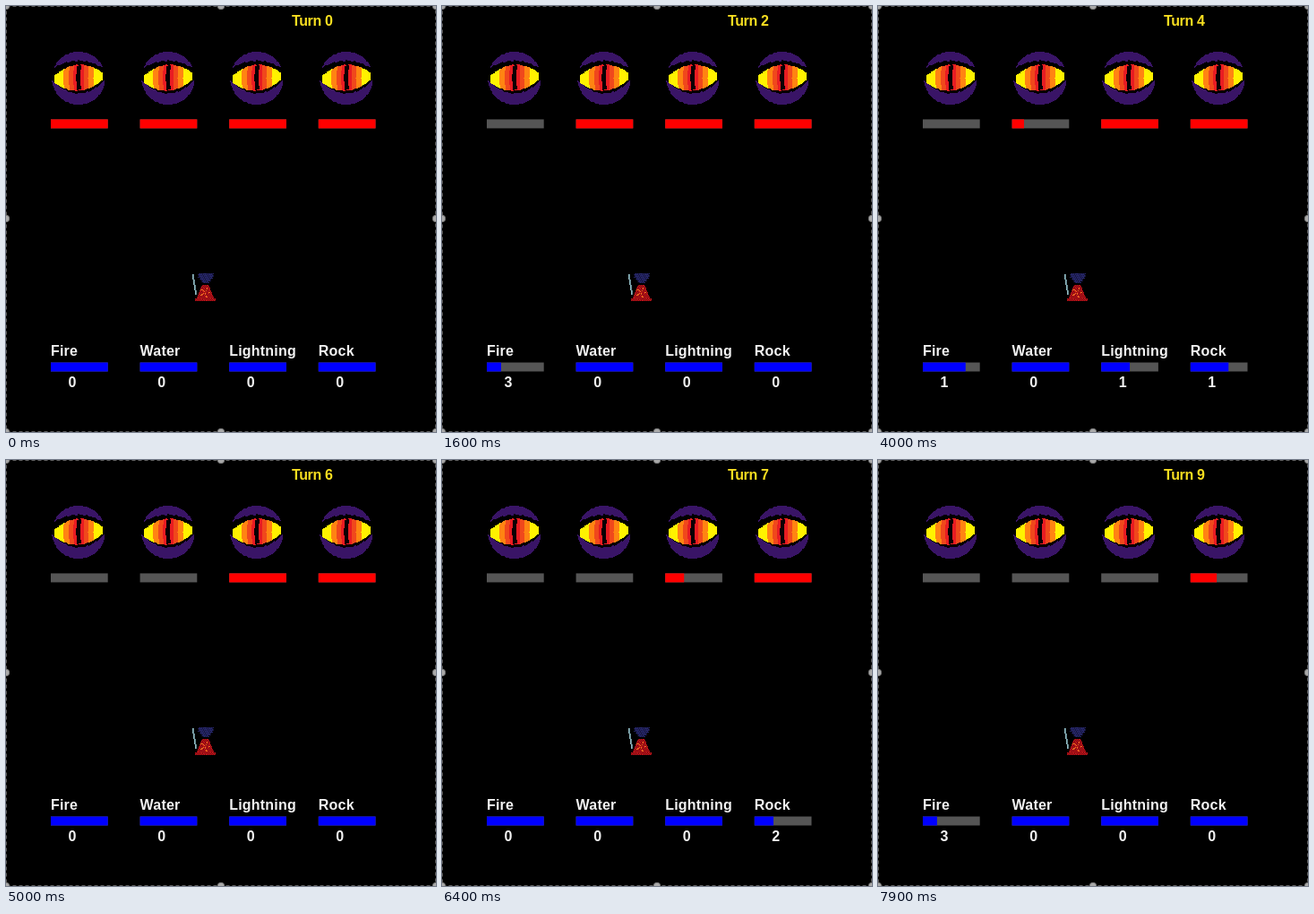
An HTML page with a canvas for the animation above (8000 ms loop, 480 by 475 pixels).

```html
<!DOCTYPE html>
<html lang="en">
<head>
<meta charset="utf-8">
<title>Spell battle</title>
<style>
html, body { margin: 0; width: 100%; height: 100%; overflow: hidden; background: #000; }
canvas { display: block; width: 480px; height: 475px; }
</style>
</head>
<body>
<canvas id="stage" width="480" height="475"></canvas>
<script>
const W = 480, H = 475, LOOP = 8000;
const ctx = document.getElementById('stage').getContext('2d');
const FONT = '"Liberation Sans", Arial, sans-serif';

const spells = [
  { name: 'Fire', cooldown: 4 },
  { name: 'Water', cooldown: 1 },
  { name: 'Lightning', cooldown: 2 },
  { name: 'Rock', cooldown: 3 }
];
const turnStart = [0, 700, 1500, 2400, 3300, 4300, 4900, 5900, 6900, 7700];
// spell index cast during each turn
const casts = [1, 0, 3, 2, 1, 1, 3, 2, 0];
// hits: [turn, enemy, health left]
const hits = [
  [1, 0, 0.7], [2, 0, 0], [3, 1, 0.54], [4, 1, 0.21],
  [5, 1, 0.08], [6, 1, 0], [7, 2, 0.33], [8, 2, 0], [9, 3, 0.46]
];
const columnX = i => 50 + i * 99.6;

function makeSprite(w, h, colorAt) {
  const c = document.createElement('canvas');
  c.width = w;
  c.height = h;
  const g = c.getContext('2d');
  for (let y = 0; y < h; y++) {
    for (let x = 0; x < w; x++) {
      const color = colorAt(x, y);
      if (color) {
        g.fillStyle = color;
        g.fillRect(x, y, 1, 1);
      }
    }
  }
  return c;
}

function eyeColor(x, y) {
  const u = x - 30.5, v = y - 32;
  const rough = Math.sin(Math.floor(x / 3) * 2.3) * 0.6;
  const iris = v + 0.5 + u * 0.06;
  const half = 3.5 + 11 * (1 - (u / 27.5) ** 2) + rough * 0.5;
  if (Math.abs(u) < 27 && Math.abs(iris) < half) {
    const s = u + Math.sin(y / 4) * 0.5;
    if (Math.abs(s) < 2.2 && Math.abs(iris) < 13.5) return '#080004';
    const ring = Math.abs(s) + (iris / 15) ** 2;
    if (ring < 6) return '#e81c22';
    if (ring < 11) return '#f0481c';
    if (ring < 17) return '#ff8412';
    return '#fff200';
  }
  const ends = (u / 28) ** 2;
  const inside = (u / 29.8) ** 2 + (v / 29.5) ** 2 + rough * 0.03 < 1;
  const upper = v < -19.5 + 8.5 * ends + rough;
  const lower = v > 17 - 13.5 * ends + rough;
  return inside && (upper || lower) ? '#391466' : null;
}
const eye = makeSprite(64, 64, eyeColor);

function wizardColor(x, y) {
  // hat
  if (y >= 2 && y < 13) {
    const half = y < 6 ? 8.5 : 8 - (y - 6) * 0.8;
    const ragged = Math.sin(y * 2.4) * 0.8;
    if (Math.abs(x - 15.5 + ragged) < half) {
      return (x * 5 + y * 3) % 11 < 4 ? '#15153c' : '#262668';
    }
  }
  // robe
  if (y >= 15 && y < 33) {
    const half = y > 29 ? 11.5 : 4 + (y - 15) * 0.4;
    if (Math.abs(x - 15) < half) {
      const dx = x - 15, dy = y - 23;
      const angle = Math.atan2(dy, dx), r = Math.hypot(dx, dy);
      if (r < 6 && Math.sin(angle * 5 + r * 0.25) > 0.82) return '#ea7020';
      return (x * 7 + y * 5) % 13 < 6 ? '#7c0a10' : '#c0141a';
    }
  }
  // staff
  if (y >= 3 && y < 26) {
    const edge = 1 + Math.floor((y - 3) / 6);
    if (x === edge) return '#8fb8c0';
    if (x === edge + 1) return '#64868e';
  }
  return null;
}
const wizard = makeSprite(30, 34, wizardColor);

function text(str, x, y, spacing, color, align = 'left') {
  ctx.font = `bold 16px ${FONT}`;
  ctx.letterSpacing = spacing + 'px';
  ctx.fillStyle = color;
  ctx.textAlign = align;
  ctx.fillText(str, x, y);
}

function bar(x, y, fill, color) {
  ctx.fillStyle = '#555';
  ctx.fillRect(x, y, 63.7, 10);
  ctx.fillStyle = color;
  ctx.fillRect(x, y, 63.7 * fill, 10);
}

function cooldownLeft(spell, turn) {
  let left = 0;
  casts.slice(0, turn).forEach((cast, t) => {
    if (cast === spell) left = Math.max(0, spells[spell].cooldown - (turn - t));
  });
  return left;
}

function health(enemy, turn) {
  let left = 1;
  for (const [t, e, hp] of hits) if (e === enemy && t <= turn) left = hp;
  return left;
}

function frame() {
  ctx.strokeStyle = '#5c5c5c';
  ctx.lineWidth = 1;
  ctx.setLineDash([4, 3]);
  ctx.strokeRect(0.5, 0.5, W - 1, H - 1);
  ctx.setLineDash([]);
  for (const x of [0, 240, W]) {
    for (const y of [0, 237, H]) {
      if (x === 240 && y === 237) continue;
      ctx.beginPath();
      ctx.arc(x, y, 3.8, 0, Math.PI * 2);
      ctx.fillStyle = '#aaa';
      ctx.fill();
      ctx.strokeStyle = '#777';
      ctx.stroke();
    }
  }
}

function draw(time) {
  const turn = turnStart.filter(t => t <= time).length - 1;
  ctx.fillStyle = '#000';
  ctx.fillRect(0, 0, W, H);
  frame();
  text('Turn ' + turn, 318.9, 22.3, -0.35, '#f8de20');
  spells.forEach((spell, i) => {
    const x = columnX(i);
    ctx.drawImage(eye, Math.round(x), 48);
    bar(x, 126.4, health(i, turn), '#f00');
    const left = cooldownLeft(i, turn);
    text(spell.name, x, 390.3, 0.2, '#f2f2f2');
    bar(x, 397.5, 1 - left / spell.cooldown, '#00f');
    text(left, x + 24, 425.3, 0, '#f2f2f2', 'center');
  });
  ctx.drawImage(wizard, 207, 296);
}

const start = performance.now();
function tick() {
  draw((performance.now() - start) % LOOP);
  requestAnimationFrame(tick);
}
tick();
</script>
</body>
</html>
```
